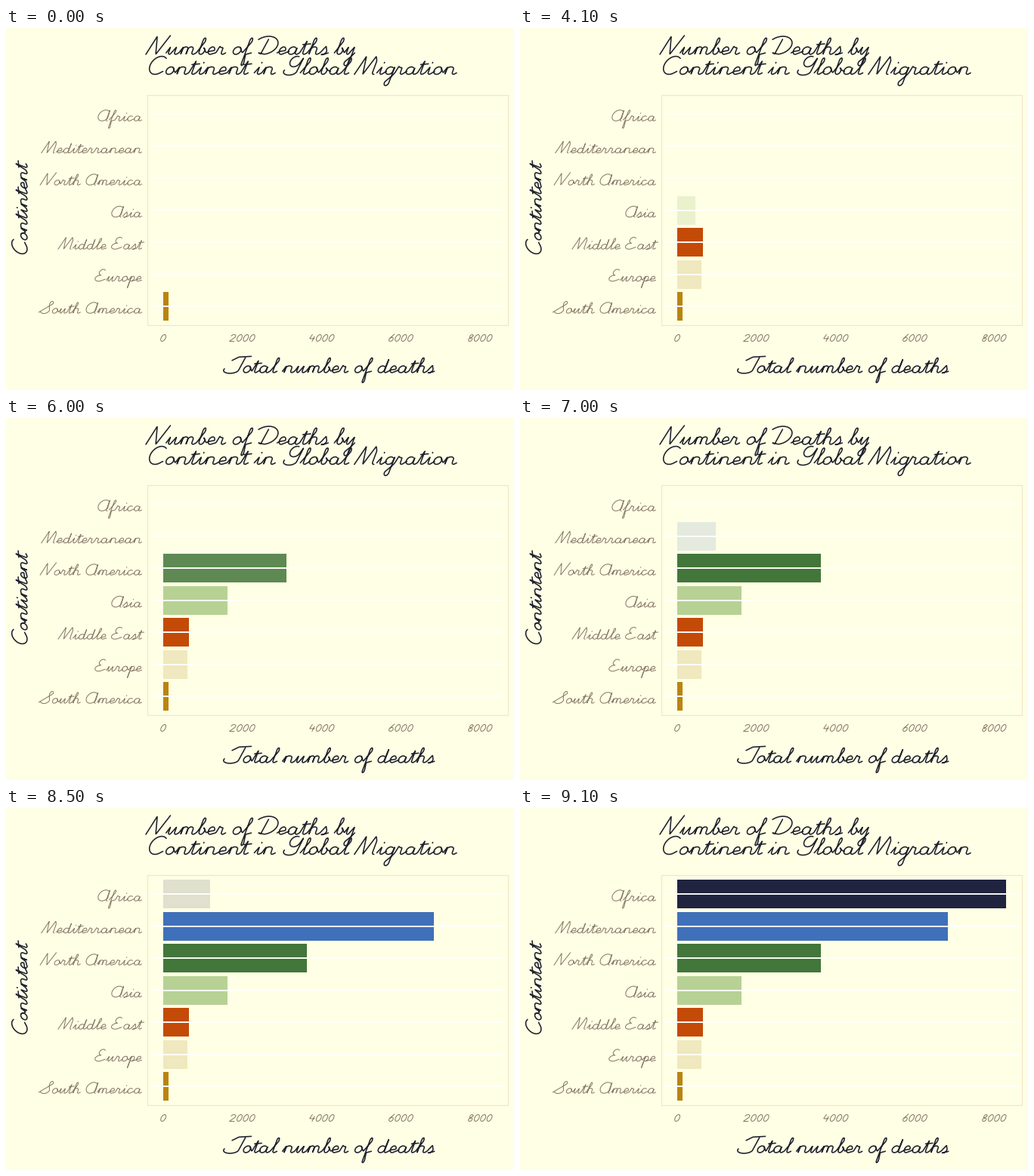
Recreate the animation shown at these times as a matplotlib script. Size 672 by 480 pixels, loop 10000 ms.

```python
import numpy as np
import matplotlib.pyplot as plt
from matplotlib.animation import FuncAnimation
from matplotlib.patches import PathPatch, Rectangle
from matplotlib.path import Path

W, H, DPI = 672, 480, 96
FRAMES, STEP = 100, 100
PX = 72 / DPI
PAPER, INK, SOFT = "#FFFFE5", "#20222E", "#8B7D6B"

# pen script in units where the x-height is 10 and capitals are about 24
SLANT, SPACE, GAP = 0.38, 8, 3
INERTIA = 2.6


def arc(x, y, rx, ry, a, b):
    t = np.radians(np.linspace(a, b, 24))
    return list(zip(x + rx * np.cos(t), y + ry * np.sin(t)))


def bowl(size=5):
    return arc(size + 1, size, size, size, 50, 330)


def stem(x, top=10):
    return [(x, top)] + arc(x + 2.5, 2.5, 2.5, 2.5, 180, 280)


def arch(x, w):
    return [(x, 0)] + arc(x + w / 2, 7, w / 2, 3, 170, 0)


def loop(x):
    return arc(x + 1.5, 18, 1.7, 4, -30, 200)


def tail(x):
    return [(x, 10)] + arc(x - 3, -11, 3, 4, 0, -200) + [(x, -3)]


def swash(x, top):
    return [(2 * x, top)] + arc(x, 4, 0.8 * x, 5, 0, -200)


GLYPHS = {
    # round letters
    "a": bowl() + stem(11, 9),
    "c": bowl(),
    "d": bowl() + stem(11, 20),
    "g": bowl() + tail(11),
    "o": arc(6, 5, 5, 5, 60, 420) + [(10, 7)],
    "e": [(3, 4)] + arc(6, 5, 4, 5, 0, 300),
    "s": [(5, 11)] + arc(3.5, 4, 4.5, 4.5, 50, -110) + [(7, 0.5)],
    # stems and arches
    "i": stem(4),
    "t": stem(4, 18),
    "u": stem(3) + stem(11),
    "y": stem(3) + tail(11),
    "r": [(2, 11), (4, 9)] + stem(7, 9),
    "n": [(3, 10)] + arch(3, 9) + stem(12, 7),
    "m": [(3, 10)] + arch(3, 7) + arch(10, 7) + stem(17, 7),
    "p": [(4, 10), (4, -14)] + arc(7, 5, 4, 5, 150, -110) + [(10, 1)],
    # ascender loops
    "l": loop(4) + stem(4, 17),
    "h": loop(3) + arch(3, 8) + stem(11, 7),
    "b": loop(3) + arc(6.5, 4.5, 3.5, 4.5, 190, 440) + [(10, 6)],
    "f": loop(4) + [(4, 0)] + arc(5.5, -11, 1.5, 4, 180, 360) + [(5, 0), (9, 1)],
    # capitals
    "A": bowl(11) + stem(20, 22),
    "C": arc(12, 12, 11, 12, 50, 310) + [(21, 4)],
    "D": [(8, 20), (5, 1), (1, 2)] + arc(7, 12, 16, 12, -80, 140),
    "E": arc(11, 18, 6, 6, 40, 270) + arc(10, 6, 9, 6, 90, 300) + [(22, 4)],
    "G": arc(13, 17, 7, 7, 70, 330) + swash(11, 22),
    "M": [(0, 0), (7, 24), (11, 0), (20, 24)] + stem(23, 18),
    "N": [(0, 0), (6, 24), (13, 0), (23, 25)],
    "S": [(-3, 2), (18, 18)] + arc(16, 19, 3.5, 5, 0, 200) + arc(8, 6, 9, 6.5, 40, -150),
    "T": swash(14, 22),
    # digits
    "0": arc(6, 7.5, 5, 7.5, 90, 450),
    "2": arc(6, 11, 5, 4, 170, -40) + [(1, 0), (12, 0)],
    "4": [(4, 15), (1, 6), (12, 6)],
    "6": [(9, 16)] + arc(6, 4.5, 4.5, 4.5, 160, 500),
    "8": arc(6, 11, 3.5, 4, 20, 270) + arc(6, 4, 4, 4, 90, -270) + [(9, 12)],
}
MARKS = {
    "i": [(5, 15), (5, 16)],
    "t": [(0, 13), (10, 14)],
    "T": [(10, 18), (18, 23), (36, 24)],
    "4": [(10, 11), (9, 0)],
}
ROUND = "acdgo"


def smooth(pts):
    """Walk the stroke evenly and average it over a short stretch of pen travel."""
    p = np.array(pts, float)
    dist = np.r_[0, np.cumsum(np.hypot(*np.diff(p, axis=0).T))]
    walk = np.arange(-INERTIA, dist[-1] + INERTIA, 0.2)
    n = int(INERTIA / 0.2)
    box = np.ones(n) / n
    return np.column_stack([np.convolve(np.interp(walk, dist, c), box, "valid")
                            for c in p.T])


def pen_strokes(s):
    """Strokes of a line of text, lowercase letters joined, and its advance."""
    strokes, pen, x = [], [], 0

    def lift(end):
        nonlocal pen
        if pen:
            strokes.append(pen + [end])
        pen = []

    for ch in s:
        if ch == " ":
            lift((x, 2))
            x += SPACE
            continue
        pts = [(x + u, v) for u, v in GLYPHS[ch]]
        if not ch.islower():
            strokes.append(pts)
        elif ch in ROUND:
            lift((x + 2, 4))
            pen = pts
        else:
            pen = pen + [(x, 2)] + pts
        if ch in MARKS:
            strokes.append([(x + u, v) for u, v in MARKS[ch]])
        x = max(u for u, _ in pts) + GAP
    lift((x, 2))
    return [smooth(k) for k in strokes], x


def write(s, x, y, size, color, lw, align=0.0, upright=False):
    strokes, adv = pen_strokes(s)
    paths = []
    for k in strokes:
        u = (k[:, 0] + SLANT * k[:, 1] - align * adv) * size
        v = k[:, 1] * size
        xy = (x - v, y - u) if upright else (x + u, y - v)
        paths.append(Path(np.column_stack(xy)))
    ax.add_patch(PathPatch(Path.make_compound_path(*paths), fc="none", ec=color,
                           lw=lw * PX, capstyle="round", joinstyle="round", zorder=4))


# chart, rows listed from the bottom up: label, bar length in px, colour
X0, PER_1000 = 208, 52.4
BOTTOM, ROW, BAR = 369.25, 42.5, 38.2
ROWS = [
    ("South America", 7, "#B98410"),
    ("Europe", 32, "#F0E8BE"),
    ("Middle East", 34, "#C44A08"),
    ("Asia", 85, "#B7D194"),
    ("North America", 190, "#43763B"),
    ("Mediterranean", 358, "#4070B9"),
    ("Africa", 435, "#20243F"),
]
CYCLE, LEAD, REST = 15.17, 6.95, 0.2

fig = plt.figure(figsize=(W / DPI, H / DPI), dpi=DPI, facecolor=PAPER)
ax = fig.add_axes([0, 0, 1, 1])
ax.set(xlim=(0, W), ylim=(H, 0))
ax.axis("off")

ax.add_patch(Rectangle((187, 89), 477, 305, fc="none", ec="#EFE6CB",
                       lw=1.2 * PX, zorder=3))

bars = []
for i, (name, _, color) in enumerate(ROWS):
    y = BOTTOM - i * ROW
    bar = Rectangle((X0, y - BAR / 2), 0, BAR, fc=color, ec="none", lw=0, zorder=1)
    bars.append(ax.add_patch(bar))
    ax.plot([191, 661], [y, y], color="#FFFFFA", lw=1.9 * PX, zorder=2,
            solid_capstyle="butt")
    write(name, 179, y + 9, 0.66, SOFT, 1.05, align=1)

for value in range(0, 8001, 2000):
    write(str(value), X0 - 1 + value / 1000 * PER_1000, 415.5, 0.6, SOFT, 1.05, align=0.5)

write("Number of Deaths by", 185, 35, 1, INK, 1.6)
write("Continent in Global Migration", 185, 61.5, 1, INK, 1.6)
write("Total number of deaths", 425, 457, 0.9, INK, 1.6, align=0.5)
write("Contintent", 28, 242, 0.85, INK, 1.6, align=0.5, upright=True)


def update(frame):
    for k, (bar, (_, length, _)) in enumerate(zip(bars, ROWS)):
        start, end = round(CYCLE * k - LEAD), round(CYCLE * k + REST)
        grown = min(max((frame - start) / (end - start), 0), 1)
        bar.set_width(length * grown)
        bar.set_alpha(grown)
    return bars


anim = FuncAnimation(fig, update, frames=FRAMES, interval=STEP, repeat=True,
                     repeat_delay=0, blit=False)
plt.show()
```
